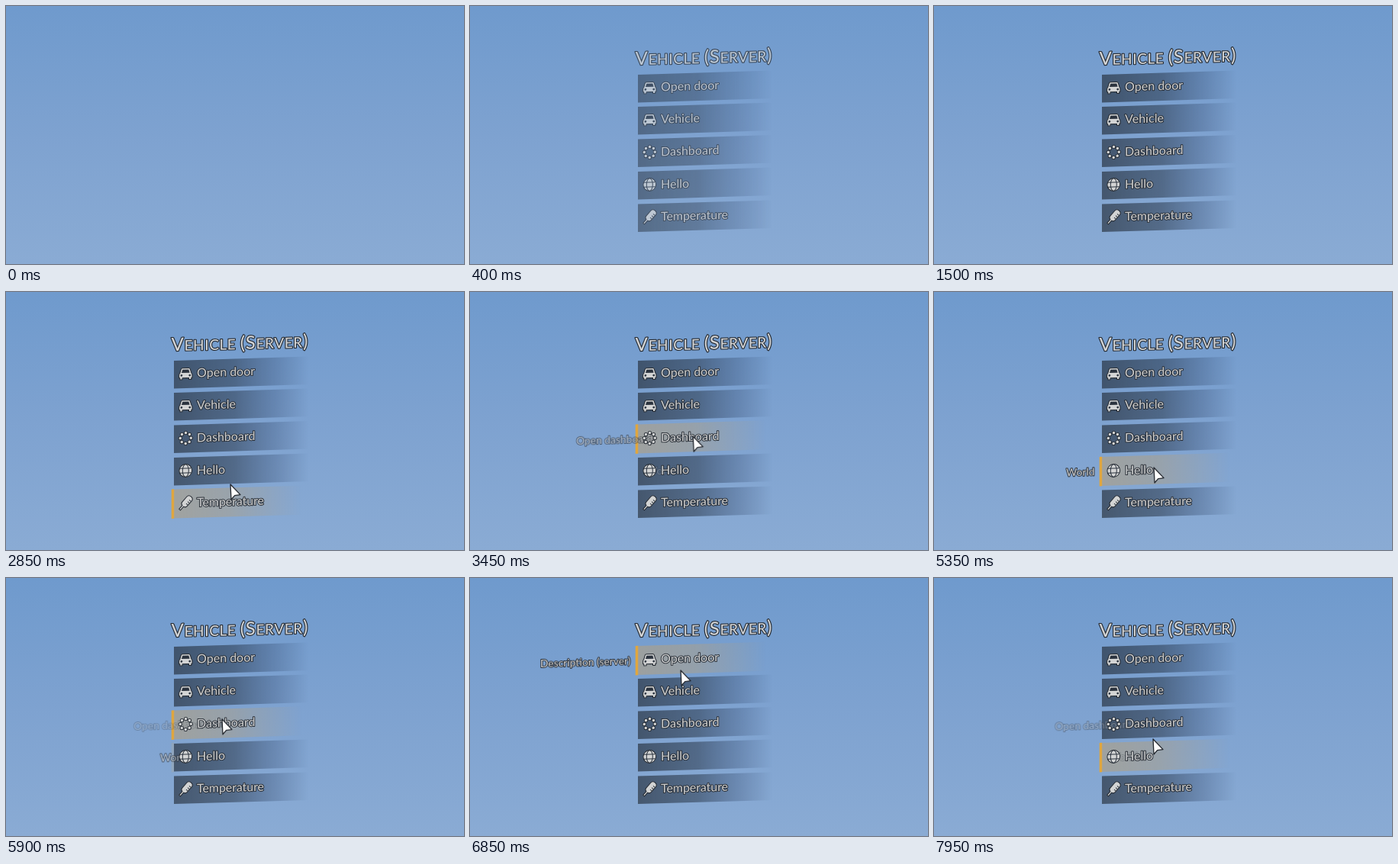
An HTML page without scripts for the animation above (8 s loop, 600x338 px).

```html
<!DOCTYPE html>
<html lang="en">
<head>
<meta charset="utf-8">
<title>Vehicle menu</title>
<style>
@property --on { syntax: "<number>"; inherits: true; initial-value: 0; }

html, body { margin: 0; width: 100%; height: 100%; overflow: hidden; background: #7fa3d1; }
svg { display: block; width: 100%; height: 100%; }
text {
  font-family: Lato, "Open Sans", sans-serif; font-weight: 500;
  fill: #c9cacb; stroke: #232931; stroke-width: 1.8px;
  stroke-linejoin: round; paint-order: stroke;
}
.title { font-size: 19px; letter-spacing: .6px; fill: #d2d3d4; stroke-width: 2.2px; }
.title .cap { font-size: 24px; }
.label { font-size: 16px; }
.note { font-size: 13.8px; text-anchor: end; }

.icon { fill: #d3d4d4; stroke: #232931; stroke-width: 1px; stroke-linejoin: round; }
.cut { fill: #2b333e; stroke: none; }
.line { fill: none; stroke: #2b333e; stroke-width: 1px; }
.cursor { fill: #fff; stroke: #23272e; stroke-width: 1.3px; stroke-linejoin: round; }

/* --on drives the row: the bar fades with it, the fill flips near 1 */
.row { --lit: clamp(0, (var(--on) - .9) * 10, 1); }
.dark { fill: url(#dark); opacity: calc(1 - var(--lit)); }
.lit { fill: url(#lit); opacity: var(--lit); }
.bar { fill: #dfa640; opacity: calc(var(--on) * var(--on)); }

.menu, .row, .note, .pointer { animation: 8s linear infinite; }
.menu { animation-name: appear; }
.pointer { animation-name: point; }
.door { animation-name: door; }
.vehicle { animation-name: vehicle; }
.dash { animation-name: dash; }
.hello { animation-name: hello; }
.temp { animation-name: temp; }
.door .note { animation-name: door-note; }
.vehicle .note { animation-name: vehicle-note; }
.dash .note { animation-name: dash-note; }
.hello .note { animation-name: hello-note; }

@keyframes appear {
  0%, 1.25% { opacity: 0; animation-timing-function: ease-out; }
  8%, 100% { opacity: 1; }
}

@keyframes door {
  0%, 77.5%, 88.9%, 100% { --on: 0; }
  78%, 86.9% { --on: 1; }
}
@keyframes vehicle {
  0%, 46.9%, 54.9%, 75%, 79.5%, 86.9%, 94.6%, 100% { --on: 0; }
  47.4%, 52.9%, 75.5%, 77.5%, 87.4%, 92.6% { --on: 1; }
}
@keyframes dash {
  0%, 40.6%, 48.9%, 52.9%, 63.1%, 72.5%, 77%, 92.6%, 99.2%, 100% { --on: 0; }
  41.1%, 46.9%, 53.4%, 61.1%, 73%, 75%, 93.1%, 97.2% { --on: 1; }
}
@keyframes hello {
  0%, 35.9%, 42.6%, 61.1%, 74.5%, 97.2% { --on: 0; }
  36.4%, 40.6%, 61.6%, 72.5%, 97.7%, 100% { --on: 1; }
}
@keyframes temp {
  0%, 30.6%, 37.9%, 100% { --on: 0; }
  31.1%, 35.9% { --on: 1; }
}

@keyframes door-note {
  0%, 77.5%, 90.4%, 100% { transform: translateX(80px); opacity: 0; }
  81.5%, 86.9% { transform: none; opacity: 1; }
}
@keyframes vehicle-note {
  0%, 46.9%, 56.4%, 75%, 81%, 86.9%, 96.1%, 100% { transform: translateX(80px); opacity: 0; }
  50.9%, 52.9%, 90.9%, 92.6% { transform: none; opacity: 1; }
  77.5% { transform: translateX(35px); opacity: .55; }
}
@keyframes dash-note {
  0%, 40.6%, 50.4%, 52.9%, 64.6%, 72.5%, 78.5%, 92.6% { transform: translateX(80px); opacity: 0; }
  44.6%, 46.9%, 56.9%, 61.1%, 96.6%, 97.2% { transform: none; opacity: 1; }
  75% { transform: translateX(35px); opacity: .55; }
  100% { transform: translateX(62px); opacity: .2; }
}
@keyframes hello-note {
  0%, 35.9%, 44.1%, 61.1%, 76%, 97.2% { transform: translateX(80px); opacity: 0; }
  39.9%, 40.6%, 65.1%, 72.5% { transform: none; opacity: 1; }
  100% { transform: translateX(50px); opacity: .4; }
}

@keyframes point {
  0%, 22.5% { transform: translate(296px, 341px); }
  28.75% { transform: translate(296px, 295px); }
  30.6% { transform: translate(295px, 284px); }
  35.63% { transform: translate(294px, 252px); }
  40.6% { transform: translate(293px, 206px); }
  46.9% { transform: translate(291px, 164px); }
  49.4% { transform: translate(290px, 150px); }
  51.9% { transform: translate(290px, 154px); }
  53.75% { transform: translate(290px, 188.5px); }
  60.6% { transform: translate(289px, 200px); }
  66.9% { transform: translate(288px, 230px); }
  70% { transform: translate(287px, 234px); }
  72.5% { transform: translate(285px, 206px); }
  75% { transform: translate(281px, 164px); }
  77.5% { transform: translate(278px, 122px); }
  80% { transform: translate(276px, 110px); }
  85.63% { transform: translate(276px, 121px); }
  92.6% { transform: translate(282px, 166px); }
  97.2% { transform: translate(286px, 204px); }
  99.38%, 100% { transform: translate(287px, 211px); }
}
</style>
</head>
<body>
<svg viewBox="0 0 600 338" preserveAspectRatio="none">
  <defs>
    <linearGradient id="sky" x2="0" y2="1">
      <stop stop-color="#6f9acd"/>
      <stop offset=".5" stop-color="#7ea2d0"/>
      <stop offset="1" stop-color="#8aabd4"/>
    </linearGradient>
    <linearGradient id="dark">
      <stop stop-color="#1e2630" stop-opacity=".62"/>
      <stop offset=".45" stop-color="#1e2a3a" stop-opacity=".48"/>
      <stop offset=".75" stop-color="#1e3050" stop-opacity=".24"/>
      <stop offset="1" stop-color="#1e3050" stop-opacity="0"/>
    </linearGradient>
    <linearGradient id="lit">
      <stop stop-color="#aaa08c" stop-opacity=".72"/>
      <stop offset=".45" stop-color="#aaa08c" stop-opacity=".55"/>
      <stop offset="1" stop-color="#aaa08c" stop-opacity="0"/>
    </linearGradient>
    <g id="back">
      <rect class="dark" width="176" height="36.5"/>
      <rect class="lit" x="-1" y="-1" width="168" height="38"/>
      <rect class="bar" x="-3.3" y="-1.2" width="3.5" height="38.5"/>
    </g>
    <g id="car">
      <path class="icon" d="M-4-7.5H4Q5.5-7.5 6-6L7.5-1Q8.7 0 8.7 2V5.5H7.5V7.7H4.2V5.5H-4.2V7.7H-7.5V5.5H-8.7V2Q-8.7 0-7.5-1L-6-6Q-5.5-7.5-4-7.5Z"/>
      <path class="cut" d="M-4-5.4H4L5.3-1.2H-5.3Z"/>
      <circle class="cut" cx="-5.4" cy="2.2" r="1.4"/>
      <circle class="cut" cx="5.4" cy="2.2" r="1.4"/>
    </g>
  </defs>

  <rect width="600" height="338" fill="url(#sky)"/>

  <g class="menu">
    <text class="title" transform="translate(216.5 77.3) skewY(-1.5)"><tspan class="cap">V</tspan>EHICLE <tspan class="cap">(S</tspan>ERVER<tspan class="cap">)</tspan></text>

    <g transform="translate(220 90) skewY(-1.8)">
      <g class="row door">
        <use href="#back"/>
        <text class="note" x="-9.5" y="22.8">Description (server)</text>
        <use href="#car" x="15.3" y="17.5"/>
        <text class="label" x="30" y="22.5">Open door</text>
      </g>
    </g>

    <g transform="translate(220 132) skewY(-1.8)">
      <g class="row vehicle">
        <use href="#back"/>
        <text class="note" x="-9.5" y="22.8">Description</text>
        <use href="#car" x="15.3" y="17.5"/>
        <text class="label" x="30" y="22.8">Vehicle</text>
      </g>
    </g>

    <g transform="translate(220 174.5) skewY(-1.8)">
      <g class="row dash">
        <use href="#back"/>
        <text class="note" x="-9.5" y="22.8">Open dashboard</text>
        <g transform="translate(15.3 17.5)" fill="none" stroke-linecap="round" stroke-dasharray="0 5.5">
          <circle r="7" stroke="#232931" stroke-width="5.2"/>
          <circle r="7" stroke="#d3d4d4" stroke-width="3.5"/>
        </g>
        <text class="label" x="30" y="22.9">Dashboard</text>
      </g>
    </g>

    <g transform="translate(220 217) skewY(-1.8)">
      <g class="row hello">
        <use href="#back"/>
        <text class="note" x="-9.5" y="23.2">World</text>
        <g transform="translate(15.3 17.5)">
          <circle class="icon" r="8.4"/>
          <ellipse class="line" rx="4" ry="8.2"/>
          <path class="line" d="M-7.5-3H7.5M-7.5 3H7.5"/>
        </g>
        <text class="label" x="30" y="23.2">Hello</text>
      </g>
    </g>

    <g transform="translate(220 259.5) skewY(-1.6)">
      <g class="row temp">
        <use href="#back"/>
        <g transform="translate(15.3 17.3) rotate(42)">
          <path class="icon" d="M-4.3-7Q-4.3-10.8 0-10.8T4.3-7V2Q4.3 4.8 1.2 5.2V11.5H-1.2V5.2Q-4.3 4.8-4.3 2Z"/>
          <path class="line" d="M1-6H3.5M1-3H3.5M1 0H3.5"/>
        </g>
        <text class="label" x="30" y="22.6" letter-spacing="-.1">Temperature</text>
      </g>
    </g>
  </g>

  <g class="pointer">
    <path class="cursor" d="M0 0L1 20L5.6 14.6L13 13.6Z"/>
  </g>
</svg>
</body>
</html>
```
